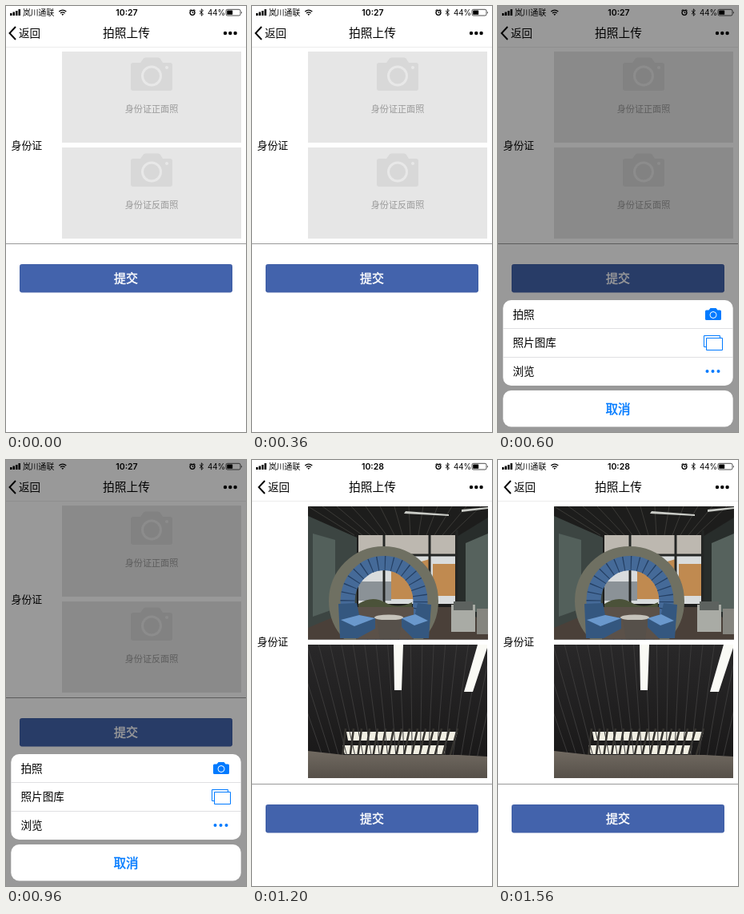
An HTML page that plays this animation: 300 by 533 pixels, repeating every 1800 ms.

```html
<!DOCTYPE html>
<html lang="zh-CN">
<head>
<meta charset="utf-8">
<title>拍照上传</title>
<style>
html, body { margin: 0; width: 100%; height: 100%; overflow: hidden; background: #fff; }
svg { display: block; width: 100vw; height: 100vh; }
text { font-family: Inter, "Noto Sans CJK SC", sans-serif; }
.mid { text-anchor: middle; }
.line { fill: none; stroke: #000; }
.blue { fill: #007aff; }
.medium { stroke-width: .4; }
</style>
</head>
<body>
<svg viewBox="0 0 300 533" preserveAspectRatio="none">
  <defs>
    <g id="slot">
      <rect x="70" y="57" width="224" height="114" fill="#e6e6e6"/>
      <path d="M159 71H168L172 65.500Q173 64.500 174.500 64.500H190Q191.500 64.500 192.500 65.500L196 71H205Q208 71 208 74V103Q208 106 205 106H159Q156 106 156 103V74Q156 71 159 71Z" fill="#d8d8d8"/>
      <circle cx="182" cy="87.500" r="11.500" fill="#d8d8d8" stroke="#e8e8e8" stroke-width="3"/>
      <circle cx="201" cy="77" r="2" fill="#e8e8e8"/>
    </g>
    <clipPath id="clipA"><rect x="70" y="58" width="225" height="166.500"/></clipPath>
    <clipPath id="clipB"><rect x="70" y="231" width="224" height="167"/></clipPath>
    <linearGradient id="wall" x2="0" y2="1"><stop stop-color="#716a61"/><stop offset="1" stop-color="#565049"/></linearGradient>
    <linearGradient id="ceiling" x2="0" y2="1"><stop stop-color="#292829"/><stop offset="1" stop-color="#171616"/></linearGradient>
  </defs>
  <rect width="300" height="533" fill="#fff"/>

  <g id="status">
    <path d="M5 9h2.500v3H5zM8.500 7.500H11V12H8.500zM12 6h2.500v6H12zM15.500 4H18v8h-2.500z"/>
    <text x="21" y="12" font-size="9.800">岚川通联</text>
    <path d="M66.300 7Q70.800 3.200 75.300 7M68 9Q70.800 6.700 73.600 9" class="line" stroke-width="1.300"/>
    <path d="M69.400 10.300Q70.800 9.200 72.200 10.300L70.800 12Z"/>
    <text id="clock" class="mid" x="151" y="12" font-size="10.500" font-weight="600"></text>
    <circle cx="233" cy="8.300" r="3" class="line" stroke-width="1.300"/>
    <path d="M229.500 6L231.500 4M236.500 6L234.500 4M233 6.500V8.500H234.500" class="line"/>
    <path d="M242 5.800L246.500 10.200L244.300 12.200V3.800L246.500 5.800L242 10.200" class="line" stroke-width=".9"/>
    <text x="252" y="12" font-size="9.700">44%</text>
    <rect x="275" y="4.300" width="18" height="7.700" rx="1.800" class="line" stroke-width=".7"/>
    <rect x="276.200" y="5.500" width="7" height="5.300" rx=".6"/>
    <path d="M294.200 6.800Q295.800 8.200 294.200 9.700Z"/>
  </g>

  <g id="back">
    <path d="M12 26L4.500 34L12 42" class="line" stroke-width="1.900"/>
    <text x="16" y="38.800" font-size="13.500">返回</text>
  </g>
  <text class="mid" x="150.500" y="39.200" font-size="14.700">拍照上传</text>
  <g><circle cx="274" cy="34" r="2.200"/><circle cx="280.300" cy="34" r="2.200"/><circle cx="286.600" cy="34" r="2.200"/></g>
  <path d="M0 51.500H300" stroke="#ececec"/>
  <text id="label" x="6.500" y="178.800" font-size="12.900">身份证</text>

  <g id="slots" class="mid" font-size="11.100" fill="#999">
    <use href="#slot"/><text x="182" y="133">身份证正面照</text>
    <use href="#slot" y="120"/><text x="182" y="252.500">身份证反面照</text>
  </g>

  <g id="photos">
    <g clip-path="url(#clipA)">
      <rect x="70" y="58" width="225" height="167" fill="#1d1d1c"/>
      <path id="beams" stroke="#3b3a37" stroke-width="1"/>
      <path d="M192 64L246 68V70L190 67ZM262 62L295 59V61L262 65Z" fill="#c9cbc6"/>
      <path d="M70 70L131 97V190L70 212Z" fill="#3c4542"/>
      <path d="M76 92L104 100V186L76 196Z" fill="#53605b"/>
      <path d="M256 96L295 72V200H256Z" fill="#282d2b"/>
      <path d="M267 104L295 92V190H267Z" fill="#56625d"/>
      <rect x="133" y="94" width="121" height="86" fill="#d9dcdd"/>
      <path d="M133 94H254V118H133Z" fill="#bdb8b0"/>
      <path d="M174 138L222 124V174H174ZM226 130H254V170H226Z" fill="#c08a50"/>
      <path d="M133 152H174V176H133ZM204 146H218V176H204Z" fill="#8b9297"/>
      <path d="M165 94V180M222 94V180M256 88V190M133 119H256" stroke="#242625" stroke-width="3"/>
      <path d="M70 210L131 184H258L295 205V225H70Z" fill="#4a4039"/>
      <circle cx="164.500" cy="176.500" r="61" fill="none" stroke="#6f7062" stroke-width="15"/>
      <g fill="none" stroke-width="18">
        <ellipse cx="165" cy="177" rx="45.500" ry="48" stroke="#456a98"/>
        <ellipse cx="165" cy="177" rx="45.500" ry="48" stroke="#243f63" stroke-dasharray="1.200 8"/>
      </g>
      <path d="M130 184H202V225H130Z" fill="#5b5149"/>
      <path d="M108 180L131 179L134 194L154 198V211L132 223H110Z" fill="#34577f"/>
      <path d="M224 181L207 179L204 193L187 198V209L201 223H221Z" fill="#34577f"/>
      <path d="M111 200L134 194L154 198L128 208ZM220 201L204 193L187 198L203 207Z" fill="#6a98cc"/>
      <path d="M133 180Q150 169 166 178T200 178V184H133Z" fill="#4b5239"/>
      <ellipse cx="171" cy="197" rx="18" ry="3.500" fill="#c6c3bb"/>
      <path d="M156 200H187L184 225H160Z" fill="#56504a"/>
      <path d="M249 181H279V215H249Z" fill="#a9aba5"/>
      <path d="M252 177H276V188H252Z" fill="#5d625f"/>
      <path d="M281 186H295V218H281Z" fill="#85857f"/>
    </g>
    <g clip-path="url(#clipB)">
      <rect x="70" y="231" width="224" height="167" fill="url(#ceiling)"/>
      <path d="M118 340H257L254 351H120ZM113 357H243L240 368H116Z" fill="#f0eee2"/>
      <path id="grille" stroke="#35332f" stroke-width="2.500"/>
      <path id="slats" stroke="#3b3a3a" stroke-width="1"/>
      <path d="M177 231H189L187 288H178ZM282 231H294V235L276 290H265Z" fill="#fafaf5"/>
      <path d="M70 364L115 369L258 369L294 371V398H70Z" fill="url(#wall)"/>
    </g>
  </g>

  <g id="footer">
    <path d="M0 297.500H300" stroke="#999"/>
    <rect x="17.500" y="323.500" width="265" height="34.500" rx="2" fill="#4363ac" stroke="#3e5da5"/>
    <text class="mid medium" x="150" y="346.300" font-size="15" fill="#fff" stroke="#fff">提交</text>
  </g>

  <g id="sheet">
    <rect width="300" height="533" opacity=".4"/>
    <rect x="6.300" y="368" width="287.400" height="107" rx="10" fill="#fff"/>
    <rect x="6.300" y="481" width="287.400" height="45.500" rx="10" fill="#fff"/>
    <path d="M6 403.500H294M6 439.500H294" stroke="#d9d9db" stroke-width=".8"/>
    <g font-size="13.600">
      <text x="18.500" y="390.500">拍照</text>
      <text x="18.500" y="426.300">照片图库</text>
      <text x="18.500" y="461.500">浏览</text>
    </g>
    <path class="blue" d="M260.500 380.500H263.500L265.500 378H272.500L274.500 380.500H277.500Q279 380.500 279 382V391.500Q279 393 277.500 393H260.500Q259 393 259 391.500V382Q259 380.500 260.500 380.500Z"/>
    <circle cx="269" cy="386.500" r="4" fill="none" stroke="#fff"/>
    <path d="M260 426.500H257.500V412.500H277.500V415.500M260.500 415.500H280.500V430.500H260.500Z" fill="none" stroke="#007aff"/>
    <g class="blue"><circle cx="261.500" cy="457" r="2"/><circle cx="268.500" cy="457" r="2"/><circle cx="275.500" cy="457" r="2"/></g>
    <text class="mid blue medium" x="150" y="509.500" font-size="15.600" stroke="#007aff">取消</text>
  </g>
</svg>
<script>
const el = id => document.getElementById(id);
const show = (id, on) => el(id).setAttribute('display', on ? 'inline' : 'none');
const shift = (id, x, y) => el(id).setAttribute('transform', `translate(${x} ${y})`);
const repeat = (id, count, segment) =>
  el(id).setAttribute('d', Array.from({ length: count }, (_, i) => segment(i)).join(''));

repeat('beams', 13, i => `M${70 + i * 18} 58L${128 + i * 10} 94`);
repeat('slats', 20, i => `M${40 + i * 14.4} 231L${88 + i * 10.2} 370`);
repeat('grille', 15, i => `M${117 + i * 10} 336L${113 + i * 9.6} 371`);

function draw() {
  const step = Math.floor(performance.now() % 1800 / 600);
  const done = step === 2;
  show('slots', !done);
  show('photos', done);
  show('sheet', step === 1);
  shift('back', done ? 4 : 0, 0);
  shift('label', 0, done ? 53.5 : 0);
  shift('footer', 0, done ? 108 : 0);
  el('clock').textContent = done ? '10:28' : '10:27';
  requestAnimationFrame(draw);
}
draw();
</script>
</body>
</html>
```
